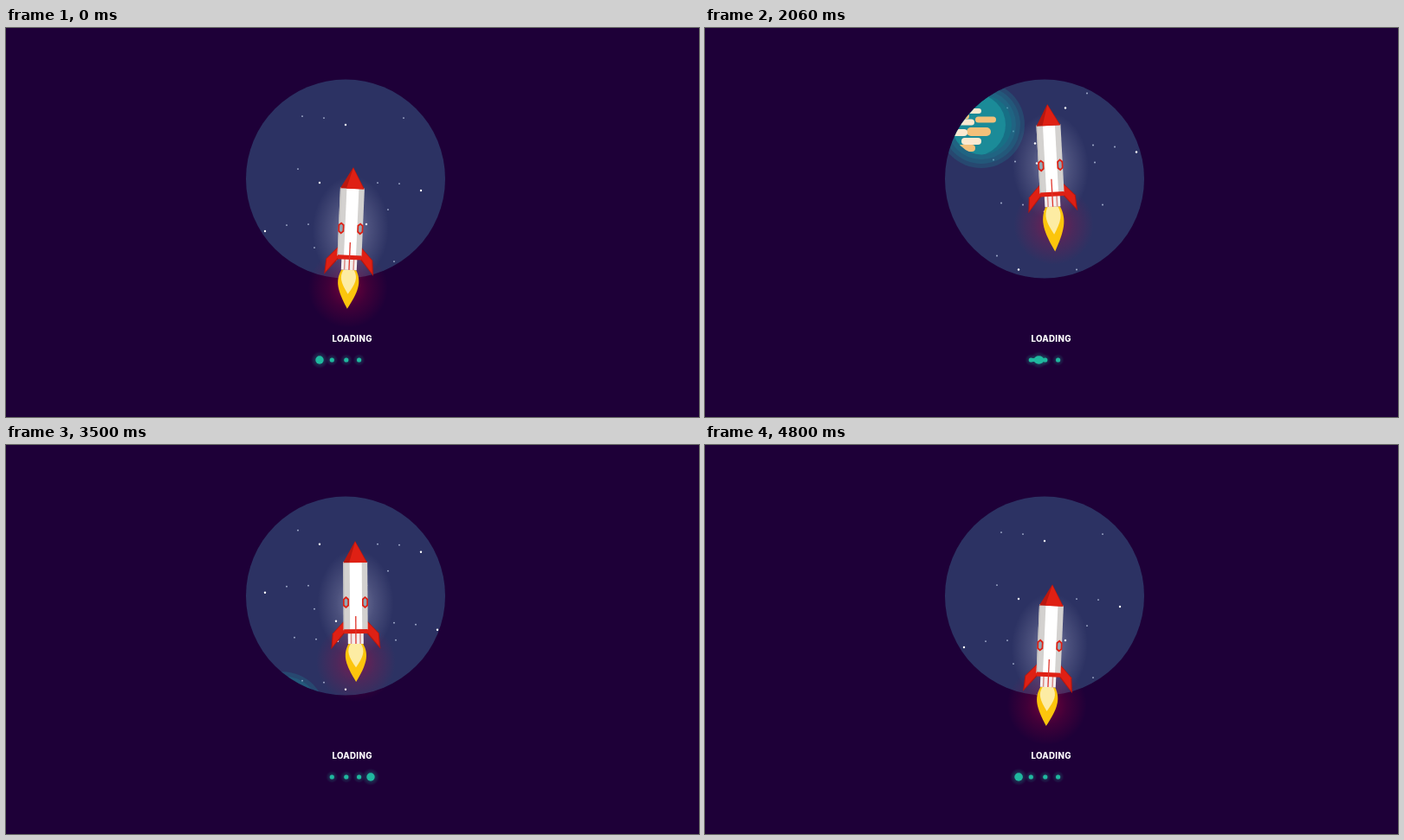
Recreate the animation shown at these times as an HTML page with a canvas. Size 800 by 450 pixels, loop 4.82 s.

```html
<!DOCTYPE html>
<html lang="en">
<head>
<meta charset="utf-8">
<title>Loading</title>
<style>
html, body { margin: 0; width: 100%; height: 100%; overflow: hidden; background: #1e0038; }
canvas { display: block; }
</style>
</head>
<body>
<canvas width="800" height="450"></canvas>
<script>
const ctx = document.querySelector('canvas').getContext('2d');
const LOOP = 4820, TAU = Math.PI * 2;
const RED = '#df2014', TEAL = '#20b89f';

// x, y at time zero; the second list holds the brighter stars
const smallStars = [[342, 102], [367, 104], [459, 104], [337, 163], [429, 179], [454, 180], [441, 210],
  [324, 228], [349, 227], [356, 254], [448, 270], [473, 272], [333, 287], [358, 289], [450, 290]];
const bigStars = [[392, 112], [362, 179], [479, 188], [416, 227], [299, 235], [381, 268], [498, 278], [383, 291]];

// time, nose x, nose y, tilt in degrees, flame length
const poses = [[0, 401, 161, 2.5, 45], [840, 398, 138, 0, 42], [1600, 403, 103, -2.5, 45],
  [2500, 389, 82, -2.9, 56], [3500, 403, 111, -.4, 44], [4400, 401, 152, 2.1, 43]];

// x, y, length, thickness, colour index
const clouds = [[302, 145, 14, 7, 0], [290, 152, 21, 7, 0], [299, 157, 20, 6, 1], [286, 163, 19, 7, 0],
  [312, 167, 24, 7, 0], [285, 170, 26, 7, 1], [302, 181, 28, 10, 0], [285, 182, 18, 8, 1],
  [296, 192, 23, 8, 1], [291, 200, 21, 8, 0]];

function poseAt(time) {
  const n = poses.length;
  const key = i => {
    const turn = Math.floor(i / n), [t, ...rest] = poses[i - turn * n];
    return [t + turn * LOOP, ...rest];
  };
  let i = n - 1;
  while (poses[i][0] > time) i--;
  const [a, b, c, d] = [i - 1, i, i + 1, i + 2].map(key);
  const span = c[0] - b[0], u = (time - b[0]) / span;
  return [1, 2, 3, 4].map(k => {
    const m0 = (c[k] - a[k]) / (c[0] - a[0]) * span;
    const m1 = (d[k] - b[k]) / (d[0] - b[0]) * span;
    const gap = c[k] - b[k];
    return b[k] + u * (m0 + u * (3 * gap - 2 * m0 - m1 + u * (m0 + m1 - 2 * gap)));
  });
}

function ellipse(x, y, rx, ry, color) {
  ctx.fillStyle = color;
  ctx.beginPath();
  ctx.ellipse(x, y, rx, ry, 0, 0, TAU);
  ctx.fill();
}
const disc = (x, y, r, color) => ellipse(x, y, r, r, color);

function poly(color, ...points) {
  ctx.fillStyle = color;
  ctx.beginPath();
  for (let i = 0; i < points.length; i += 2) ctx.lineTo(points[i], points[i + 1]);
  ctx.closePath();
  ctx.fill();
}

function rect(color, x, y, w, h) {
  ctx.fillStyle = color;
  ctx.fillRect(x, y, w, h);
}

function glow(x, y, r, rgb, alpha, stretch = 1) {
  ctx.save();
  ctx.translate(x, y);
  ctx.scale(1, stretch);
  const g = ctx.createRadialGradient(0, 0, 0, 0, 0, r);
  g.addColorStop(0, `rgba(${rgb},${alpha})`);
  g.addColorStop(.5, `rgba(${rgb},${alpha * .4})`);
  g.addColorStop(1, `rgba(${rgb},0)`);
  disc(0, 0, r, g);
  ctx.restore();
}

function drawPlanet(y) {
  ctx.save();
  ctx.translate(0, y - 173);
  for (const r of [50, 45, 40]) disc(319, 173, r, 'rgba(25,135,150,.25)');
  ctx.beginPath();
  ctx.arc(319.5, 173, 34.5, 0, TAU);
  ctx.clip();
  disc(319.5, 173, 36, '#176f85');
  disc(311, 173, 36, '#1b8b98');
  for (const [x, cy, length, thick, color] of clouds) {
    ctx.fillStyle = ['#f3c07a', '#fbe9d0'][color];
    ctx.beginPath();
    ctx.roundRect(x, cy - thick / 2, length, thick, thick / 2);
    ctx.fill();
  }
  ctx.restore();
}

function drawSpace(t) {
  ctx.save();
  ctx.beginPath();
  ctx.arc(392, 174.5, 115, 0, TAU);
  ctx.clip();
  rect('#2c3263', 270, 50, 250, 250);
  const fall = y => 56 + (y - 56 + t / LOOP * 235) % 235;
  for (const [x, y] of smallStars) disc(x, fall(y), .9, '#aeb9d6');
  for (const [x, y] of bigStars) disc(x, fall(y), 1.2, '#fff');
  drawPlanet(173 + (t - 2500) * .139);
  ctx.restore();
}

function drawFlame(width, length, color) {
  ctx.fillStyle = color;
  ctx.beginPath();
  ctx.moveTo(-width * .7, 119);
  ctx.bezierCurveTo(-width * 1.3, 119 + length * .3, -width, 119 + length * .55, 0, 119 + length);
  ctx.bezierCurveTo(width, 119 + length * .55, width * 1.3, 119 + length * .3, width * .7, 119);
  ctx.fill();
}

function drawRocket(t) {
  const [x, y, tilt, flame] = poseAt(t);
  ctx.save();
  ctx.translate(x, y);
  ctx.rotate(tilt * Math.PI / 180);
  glow(0, 72, 44, '235,235,255', .4, 1.4);
  glow(0, 140, 46, '215,0,60', .45);

  drawFlame(12, flame, '#fcc50c');
  drawFlame(8.5, flame * .62, '#fdeca3');

  rect('#f4eeee', -9, 106, 18, 13);
  for (const sx of [-6, 4.5]) rect('#d98a86', sx, 106, 1.5, 13);

  for (const side of [-1, 1]) {
    poly('#b5160f', side * 13, 92, side * 27, 107, side * 28.5, 125, side * 13, 107);
    poly(RED, side * 13, 93, side * 26, 107, side * 27, 122, side * 13, 105);
  }

  rect('#d3d1cf', -14, 24, 28, 79);
  rect('#fff', -6.5, 24, 14, 79);
  rect('#c3c1c0', -14, 24, 1.2, 79);
  poly('#b9170f', 0, 0, -14, 25, 14, 25);
  poly(RED, 0, 1, -7, 25, 13, 25);
  rect(RED, -13.5, 102, 27.5, 5);
  rect('#e0342a', -.5, 87, 1.3, 32);

  for (const wx of [-11, 11]) {
    poly(RED, wx - 3.5, 67, wx, 64, wx + 3.5, 67, wx + 3.5, 75, wx, 78, wx - 3.5, 75);
    poly('#93a9b5', wx - 1.8, 68, wx, 66.3, wx + 1.8, 68, wx + 1.8, 74, wx, 75.7, wx - 1.8, 74);
  }
  ctx.restore();
}

function drawLoader(t) {
  ctx.fillStyle = '#fff';
  ctx.font = '800 9.7px Inter, sans-serif';
  ctx.letterSpacing = '0.3px';
  ctx.textAlign = 'center';
  ctx.fillText('LOADING', 399.6, 363);

  const ramp = (a, b) => {
    const u = Math.min(1, Math.max(0, (t % (LOOP / 2) - a) / (b - a)));
    return [u * u * (3 - 2 * u), 4 * u * (1 - u)];
  };
  const [out, outSpeed] = ramp(100, 1000), [back, backSpeed] = ramp(1600, 2410);
  const x = 362 + 59 * (out - back);
  for (const dot of [376.3, 392.8, 407.6]) {
    glow(dot, 384, 7, '32,184,159', .45);
    disc(dot, 384, 2.6, TEAL);
    if (Math.abs(x - dot) < 11) rect(TEAL, Math.min(x, dot), 382, Math.abs(x - dot), 4);
  }
  glow(x, 384, 10, '32,184,159', .6);
  ellipse(x, 384, 4.7 + 1.3 * (outSpeed + backSpeed), 4.7, TEAL);
}

function frame(now) {
  const t = now % LOOP;
  rect('#1e0038', 0, 0, 800, 450);
  drawSpace(t);
  drawRocket(t);
  drawLoader(t);
  requestAnimationFrame(frame);
}
requestAnimationFrame(frame);
</script>
</body>
</html>
```
